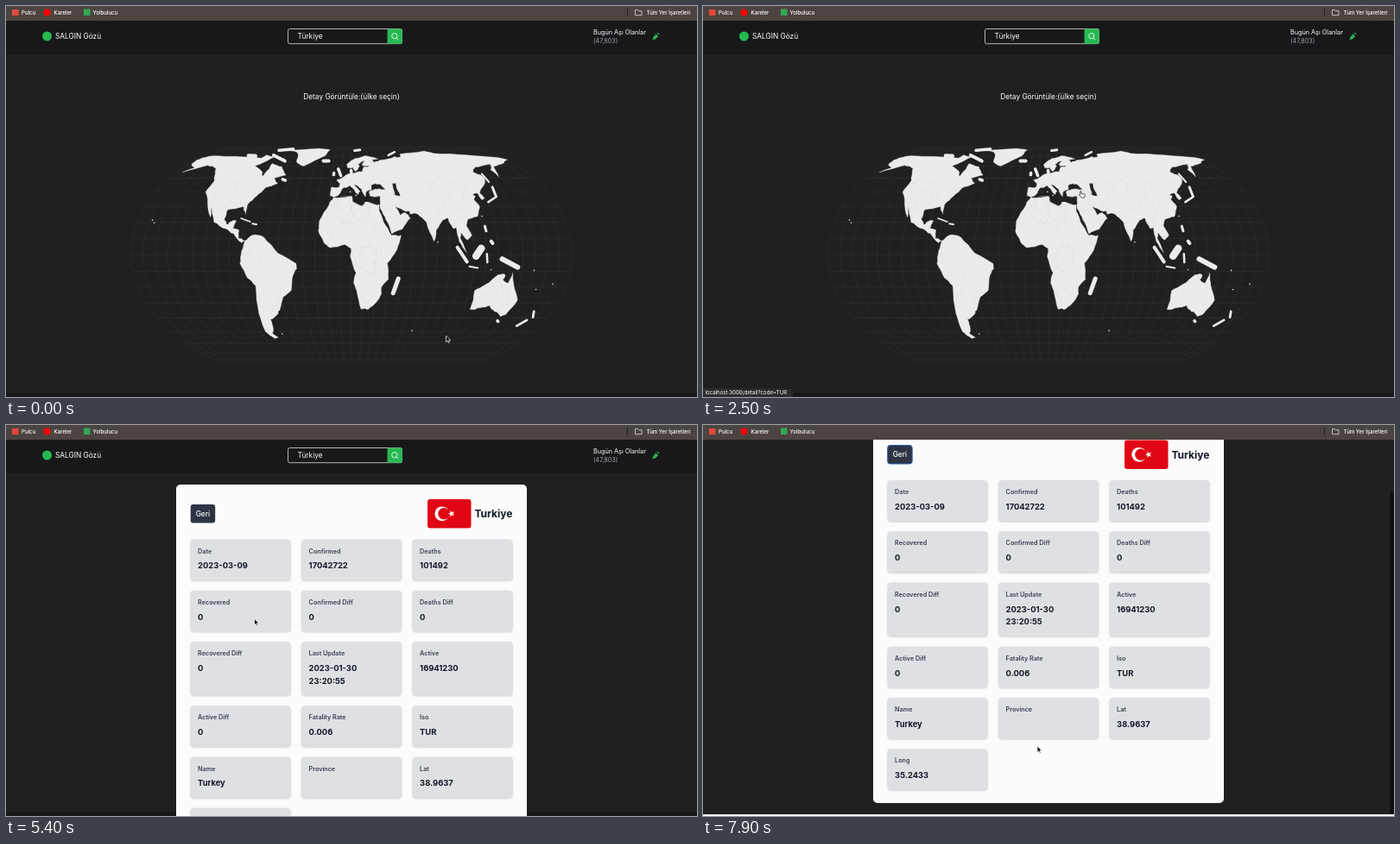
Recreate the animation shown at these times as an HTML page. Size 800 by 453 pixels, loop 8000 ms.

```html
<!DOCTYPE html>
<html lang="tr">
<head>
<meta charset="utf-8">
<title>Salgın haritası</title>
<style>
  html, body { margin: 0; height: 100%; overflow: hidden; background: #202022; }
  svg { display: block; width: 100vw; height: 100vh; }
  text { font-family: Inter, "Open Sans", sans-serif; font-size: 8.3px; fill: #fff; }
  .bar text { font-size: 6.1px; font-weight: 500; }
  .card { fill: #dfe0e4; filter: drop-shadow(0 1px 1px #0003); }
  .label { font-size: 7.2px; font-weight: 600; fill: #374151; }
  .value { font-size: 9.4px; font-weight: 700; fill: #111827; }
  .grid { fill: none; stroke: #303033; stroke-width: .6; }
  .land { fill: #ebebec; stroke: #ebebec; stroke-width: .3; }
  .island { stroke: #ebebec; stroke-linecap: round; }
  .border { fill: none; stroke: #dcdce0; stroke-width: .4; }
  .country { fill: none; stroke: #d6d6da; stroke-width: .4; }
  .country.on { fill: #27b951; stroke: #27b951; }
</style>
</head>
<body>
<svg id="stage" viewBox="0 0 800 453"></svg>
<script>
const LOOP = 8000, SCROLL = 68.5;

// Equal Earth projection, centred on 10 degrees east
function project([lon, lat]) {
  const theta = Math.asin(Math.sqrt(3) / 2 * Math.sin(lat * Math.PI / 180));
  const a = theta * theta, b = a * a * a, scale = 94.4;
  const slope = 1.340264 - .243318 * a + b * (.006251 + .034164 * a);
  const x = (lon - 10) * Math.PI / 180 * Math.cos(theta) / (Math.sqrt(3) / 2 * slope);
  const y = theta * (1.340264 - .081106 * a + b * (.000893 + .003796 * a));
  return [(400 + scale * x).toFixed(1), (288.3 - scale * y).toFixed(1)];
}

const trace = points => 'M' + points.map(p => project(p).join(' ')).join('L');
const pairs = list => Array.from({ length: list.length / 2 }, (_, i) => list.slice(2 * i, 2 * i + 2));

let seed = 7;
const random = () => (seed = seed * 16807 % 2147483647) / 2147483647 - .5;

// Splits every edge at a displaced midpoint to give a natural coastline
function roughen(points, limit) {
  return points.flatMap((p, i) => {
    const q = points[(i + 1) % points.length], dx = q[0] - p[0], dy = q[1] - p[1];
    const shift = random() * Math.min(.3, limit / Math.hypot(dx, dy));
    return [p, [(p[0] + q[0]) / 2 - dy * shift, (p[1] + q[1]) / 2 + dx * shift]];
  });
}
const coast = list => trace(roughen(roughen(pairs(list), 1.2), .8)) + 'Z';

const africa = [-6,36,10,37,11,33.5,19,30.3,22,33,32,31,34.5,31,34,27,37,20,43,11.8,51,11.8,47,3,39.3,-5,40.6,-15,
  35,-20,35.5,-24,32,-29,25,-34,18.5,-34,14.4,-22,11.8,-17,13.8,-11,9,-1,9.5,4,4.4,6.3,-7.6,4.4,-13,8,-17.4,14.8,-17,21,-9.7,31];
const europe = [-9,37,-9,43.2,-1.5,43.4,-1.2,46,-4.7,48.4,2.5,51.1,8.5,53.8,8.2,57,10.5,57.5,11,54,21,55,23.5,59.2,
  30,60,36,64,44,66,62,69.5,62,46,49,46,49.5,38.3,41.5,41.5,37,45.3,33,46,28.5,44.5,28,41.2,23.8,40.2,22.6,36.6,
  19.3,41.9,12.5,45.3,18,40.2,16,38,12.2,41.8,8.8,44.4,3.1,43,-.3,39,-5.6,36.1];
const scandinavia = [30,60,22.8,60,21.4,62,25,65.5,17.3,61.8,18.8,60,14.2,55.4,11.2,59,6,58.5,5,61.8,14.5,67.8,26,71,41,67,33.5,66.7,36,62];
const asia = [60,69.5,68,69,70,73,104,77.6,113,74,140,72.6,180,69,190,66.2,178,62.4,163.5,59.8,156.8,51,156,57,163,61.8,
  142,59,135.3,54.7,141,52,140.5,48.5,127.5,39.5,129.2,35.3,126.4,34.5,125,39,118,39,122,37,119.3,35,121.8,30,117,23.5,
  108,21.6,105.8,18,109.2,12,105,9,100.7,13.5,99.4,10,104,1.4,98.3,8,97.3,16.8,94.4,16.2,91.8,22.5,87,21.4,80.2,15,
  77.5,8.1,73,20,66.6,25.2,60,25.3];
const middleEast = [26.2,40,29,41.1,35,42,41.5,41.5,49,38,54,37,52.7,41,53,47,66,46,66,25.3,57,26.8,48,30,51.5,24.5,
  56.3,26,59.8,22.5,52,15.5,43.3,12.8,39,21.5,34.9,28.5,36,36.5,30.5,36.5,27,37];
const northAmerica = [-168,65.7,-166,68.3,-156,71,-128,70,-96,68,-94,72,-82,69.6,-87,64.5,-94.5,60,-82.4,55.2,-79,51.3,
  -77,57.5,-78,62.4,-65,59.5,-56,52.3,-66.5,50,-61,46,-70.5,43,-75.7,37,-81.2,31.5,-80.5,25.2,-84,30,-97,28,-97.5,22,
  -94,18.3,-90,21,-87,21,-88.5,16,-83.3,15,-83,10,-77.4,8.5,-80,7.4,-87.5,13,-94.5,16,-105.5,20,-113,31,-109.6,23.1,
  -117.3,33,-124.2,40,-123.5,48,-134,58,-147,60.8,-164,54.6,-157.5,58.6,-165.8,61.5];
const southAmerica = [-77.4,8.5,-71.7,12,-62,10.7,-50,1,-35.2,-5.3,-35,-8.5,-39,-14,-41,-22,-48.5,-26,-53.5,-34,
  -57,-37.5,-65,-41,-65.8,-47.6,-69,-51,-65.2,-54.8,-70,-55.2,-75,-50,-73.6,-37,-70.2,-19,-76.2,-14,-81.2,-5,-80,0];
const australia = [114,-22,115.5,-34.2,124,-33,131.5,-31.5,138,-35.5,146,-39,150,-37.3,153.5,-28,146,-19,142.5,-10.8,
  140.5,-17.4,135.5,-15,136.8,-12.2,131,-12,122,-18];
const greenland = [-73,78.3,-33,83.6,-18,80,-22,71,-42,60,-52,64,-55,71.5,-60,76];

// Islands are thick strokes: both ends and a width
const islands = [
  [-85,71.5,-66,65,4], [-115,71,-106,70.5,4.5], [-85,79,-68,82,3.5], [-57.5,49,-54.5,48.3,3.5],
  [-83.5,22.5,-75,20.3,1.6], [-73,19,-69.5,18.7,2], [-22,65,-16,65,4], [-4,57.5,-.8,52,3.5], [-8,54,-8,52.6,3.5],
  [48.8,-14.5,45.4,-23.5,5], [96.5,4.5,104.3,-4.2,4], [106.5,-7,113.5,-7.9,2], [111.5,-.8,116,4,8.5],
  [120.5,.5,121,-4.5,2.5], [133,-2.5,146,-7.5,6], [121.2,17.5,121.5,14.5,3], [124.5,8.2,125.5,7,4],
  [131,33,140.5,36.5,2.6], [140.5,37,142.5,43.3,3], [142.7,53.5,142.8,47,2], [55,71.5,65,76,2.5],
  [14,78.5,21,79.8,3], [146,-42,147,-42.5,3.5], [173.5,-35.5,176.5,-39.5,2.8], [173,-41.5,168,-45.7,2.8]
];
const islets = [-155.5,19.6,-157.8,21.3,69.5,-49.3,-59.5,-51.8,165.5,-21.3,178,-17.8,160,-9.5,124.5,-9,121,23.8,80.7,7.7,9,40,14,37.5];

const countries = {
  DZA: ['Algeria', [-8.6,27.4,-8.6,28.7,-1.2,32.3,-2.2,35.1,3,36.9,8.6,36.9,7.5,33.8,9.5,30.2,9.9,26.5,12,23.5,5.8,19.5,3.2,19.1,1.2,21.1]],
  TUR: ['Turkey', [26.2,40,29,41.1,35,42,41.5,41.5,44.5,38,36.5,36.6,30.5,36.5,27,37]],
  LBY: ['Libya', [9.9,26.5,9.5,30.2,11.5,33,19,30.3,25,31.6,24,19.5,14.2,22.6,12,23.5]],
  COD: ['Dem. Rep. Congo', [12.5,-5.8,18.5,4.5,27.4,5,31,2,29.3,-6,29.6,-13.3,19,-8]]
};

const rect = (x, y, w, h, fill, more = '') => `<rect x="${x}" y="${y}" width="${w}" height="${h}" fill="${fill}" ${more}/>`;
const text = (x, y, content, more = '') => `<text x="${x}" y="${y}" ${more}>${content}</text>`;
const path = (d, more) => `<path d="${d}" ${more}/>`;
const polyline = (steps, point) => trace(Array.from({ length: steps + 1 }, (_, i) => point(i)));

function graticule() {
  let d = '';
  for (let lon = -170; lon <= 190; lon += 10) {
    const limit = (lon - 10) % 180 ? 80 : 90;
    d += polyline(36, i => [lon, -limit + i * limit / 18]);
  }
  for (let lat = -90; lat <= 90; lat += 10) d += polyline(1, i => [-170 + 360 * i, lat]);
  return d;
}

// A wavy net, clipped to the land, suggests country borders
function borderNet() {
  let d = '';
  for (let lon = -125; lon < 150; lon += 9) d += polyline(40, i => [lon + 3 * Math.sin(i * .7 + lon), -35 + i * 2.1]);
  for (let lat = -33; lat < 55; lat += 9) d += polyline(130, i => [-125 + i * 2, lat + 2.5 * Math.sin(i * .6 + lat)]);
  return d;
}

function mapPage() {
  const land = [africa, europe, scandinavia, asia, middleEast, northAmerica, southAmerica, australia, greenland].map(coast).join('');
  return text(400, 108, '', 'id="title" text-anchor="middle"')
    + path(graticule(), 'class="grid"') + path(land, 'class="land"')
    + `<clipPath id="shore">${path(land, '')}</clipPath>` + path(borderNet(), 'class="border" clip-path="url(#shore)"')
    + islands.map(([a, b, c, d, width]) => path(trace([[a, b], [c, d]]), `class="island" stroke-width="${width}"`)).join('')
    + pairs(islets).map(p => path(trace([p, p]), 'class="island" stroke-width="1.6"')).join('')
    + Object.entries(countries).map(([code, [, shape]]) => path(trace(pairs(shape)) + 'Z', `class="country" id="${code}"`)).join('');
}

const backButton = x => rect(x, 92, 28.5, 21.5, '#2d3443', 'rx="3" class="back"') + text(x + 14.2, 105.8, 'Geri', 'text-anchor="middle" font-weight="500"');

function skeletonPage() {
  let out = rect(207, 69, 386, 460, '#fcfcfc', 'rx="5"') + backButton(224)
    + rect(426, 86, 50.7, 33.5, '#8e96a0', 'rx="3"') + rect(481, 93.3, 95, 18.7, '#8e96a0', 'rx="3"');
  for (let i = 0; i < 16; i++) {
    const x = 224 + i % 3 * 121.7, y = 132.5 + Math.floor(i / 3) * 59.3;
    out += rect(x, y, 109, 47.3, '', 'rx="4" class="card"')
      + rect(x + 8.3, y + 8.2, 37, 10.4, '#c8cbd0', 'rx="3"') + rect(x + 8.3, y + 23, 69, 14.8, '#8e96a0', 'rx="3"');
  }
  return out;
}

function flag() {
  const star = Array.from({ length: 10 }, (_, i) => {
    const r = i % 2 ? 1.6 : 4.2, a = Math.PI * (1 + i / 5);
    return [515.8 + r * Math.cos(a), 102.8 + r * Math.sin(a)];
  });
  return rect(488, 86, 50.5, 33.6, '#e00613', 'rx="3"') + '<circle cx="504.7" cy="102.8" r="8.4" fill="#fff"/>'
    + '<circle cx="506.9" cy="102.8" r="6.7" fill="#e00613"/>' + `<polygon points="${star}" fill="#fff"/>`;
}

function detailPage() {
  const fields = [['Date', '2023-03-09'], ['Confirmed', '17042722'], ['Deaths', '101492'],
    ['Recovered', '0'], ['Confirmed Diff', '0'], ['Deaths Diff', '0'],
    ['Recovered Diff', '0'], ['Last Update', '2023-01-30', '23:20:55'], ['Active', '16941230'],
    ['Active Diff', '0'], ['Fatality Rate', '0.006'], ['Iso', 'TUR'],
    ['Name', 'Turkey'], ['Province', ''], ['Lat', '38.9637'], ['Long', '35.2433']];
  const cards = fields.map(([label, value, second = ''], i) => {
    const row = Math.floor(i / 3), x = 213.7 + i % 3 * 128.5, y = 132.5 + row * 59.3 + (row > 2 ? 14.8 : 0);
    return rect(x, y, 115.7, row === 2 ? 62 : 47.3, '', 'rx="4" class="card"')
      + text(x + 8.4, y + 16.1, label, 'class="label"') + text(x + 8.4, y + 33.9, value, 'class="value"')
      + text(x + 8.4, y + 48.8, second, 'class="value"');
  });
  return rect(197, 69, 406, 437.5, '#fcfcfc', 'rx="5"') + backButton(213.7) + flag()
    + text(586.5, 107.2, 'Turkiye', 'text-anchor="end" style="font-size:12px;font-weight:700;fill:#111827"') + cards.join('');
}

const header = rect(0, 17, 800, 39, '#18181a') + '<circle cx="47.5" cy="35" r="5.5" fill="#27b951"/>'
  + text(57, 38, 'SALGIN Gözü') + rect(326.5, 26.5, 132, 17.2, '#18181a', 'rx="2" stroke="#ddd" stroke-width=".8"')
  + text(337.5, 38, 'Türkiye') + rect(441.5, 26.5, 17.2, 17.2, '#27b951', 'rx="1.5"')
  + path('M452 37L454 39.2M452.9 34.7a3.1 3.1 0 1 1-6.2 0a3.1 3.1 0 1 1 6.2 0', 'fill="none" stroke="#fff" stroke-width=".8"')
  + text(680, 32.5, 'Bugün Aşı Olanlar', 'style="font-size:7.25px"') + text(680, 43, '(47,803)', 'style="font-size:7.2px;fill:#9ca3af"')
  + path('M748 39.5l2-2M754 30.5l2.5 2.5M755.2 31.8l-1.8 1.8M751.5 32.2l3.6 3.6', 'stroke="#27b951"')
  + path('M752.2 33l2.4 2.4l-3 3l-2.3.3l-.2-2.4Z', 'fill="#27b951"');

const bookmarks = rect(0, 0, 800, 17, '#4c4440') + rect(7, 4, 7.5, 7, '#e5483c') + '<circle cx="47.5" cy="7.5" r="4" fill="#f00"/>'
  + rect(90, 3.5, 7.5, 7.5, '#34a853') + text(18, 9.6, 'Pulcu') + text(55.5, 9.6, 'Kareler') + text(100.5, 9.6, 'Yolbulucu')
  + rect(719, 3, .8, 8.5, '#1c1816') + path('M728.5 4.5h2.8l1 1.2h3.7v5h-7.5Z', 'fill="none" stroke="#ddd" stroke-width=".8"')
  + text(792.5, 9.6, 'Tüm Yer İşaretleri', 'text-anchor="end"');

const stage = document.getElementById('stage');
stage.innerHTML = rect(0, 0, 800, 453, '#202022') + rect(0, 448, 800, 5, '#18181a', 'id="floor"')
  + `<g id="page">${header}<g id="map">${mapPage()}</g><g id="skeleton">${skeletonPage()}</g><g id="detail">${detailPage()}</g></g>`
  + `<g id="scrolled">${rect(795.5, 0, 4, 375, '#0c0c0d', 'rx="2" id="thumb"')}${rect(0, 451, 800, 2, '#f4f4f4', 'id="edge"')}</g>`
  + `<g class="bar">${bookmarks}</g>`
  + `<g class="bar" id="status">${rect(-3, 443, 107, 13, '#2b2b2d', 'rx="2"')}${text(2.5, 450, '', 'id="link" style="font-weight:400"')}</g>`
  + `<g id="cursor">${path('M0 0V7.3L1.7 5.7L2.9 8.3L4.1 7.8L2.9 5.3H5.2Z', 'id="arrow" fill="#000" stroke="#fff" stroke-width=".7"')}`
  + path('M1.2.8Q2 0 2.6.9V3.2L6 3.9Q7 4.2 6.8 5.4L6 8H2.8L.2 5.2Q0 4.2 1.2 4.6Z', 'id="hand" fill="#fff" stroke="#111" stroke-width=".7"') + '</g>';

const el = Object.fromEntries([...stage.querySelectorAll('[id]')].map(node => [node.id, node]));
const show = (node, visible) => node.setAttribute('display', visible ? 'inline' : 'none');
const move = (node, x, y) => node.setAttribute('transform', `translate(${x} ${y})`);
const smooth = p => p * p * (3 - 2 * p);

const cursorStops = [[0, 509.5, 382], [200, 507, 380], [400, 507, 380], [1500, 391, 245], [2000, 391, 245], [2400, 435.5, 214],
  [3700, 435.5, 215], [5000, 287.5, 224.5], [6400, 287.5, 224.5], [7400, 387, 372], [LOOP, 387, 372]];
const hovers = [[0, ''], [1100, 'COD'], [1300, ''], [1400, 'DZA'], [2100, 'LBY'], [2200, ''], [2400, 'TUR'], [3900, '']];

function cursorAt(t) {
  const i = cursorStops.findIndex(stop => stop[0] > t);
  const [t0, x0, y0] = cursorStops[i - 1], [t1, x1, y1] = cursorStops[i];
  const p = smooth((t - t0) / (t1 - t0));
  return [x0 + (x1 - x0) * p, y0 + (y1 - y0) * p];
}

function draw(now) {
  const t = Math.floor(now % LOOP / 100) * 100;
  const onMap = t < 3200, loading = !onMap && t < 3600;
  const code = hovers.findLast(([start]) => start <= t)[1];
  const lit = onMap && (code !== 'TUR' || t >= 2600) ? code : '';

  show(el.map, onMap);
  show(el.skeleton, loading);
  show(el.detail, !onMap && !loading);
  for (const key in countries) el[key].classList.toggle('on', key === lit);
  el.title.textContent = 'Detay Görüntüle:' + (lit ? countries[lit][0] : '(ülke seçin)');

  show(el.status, code);
  el.link.textContent = 'localhost:3000/detail?code=' + code;

  const scroll = SCROLL * smooth(Math.min(1, Math.max(0, (t - 7400) / 400)));
  move(el.page, 0, -scroll);
  show(el.scrolled, scroll > 0);
  show(el.edge, scroll === SCROLL);
  show(el.floor, scroll === 0);
  move(el.thumb, 0, 17 + scroll * .89);
  el.detail.querySelector('.back').setAttribute('stroke', scroll > 0 ? '#2f5fb3' : 'none');

  const overLink = onMap && code;
  show(el.hand, overLink);
  show(el.arrow, !overLink);
  move(el.cursor, ...cursorAt(t));
  requestAnimationFrame(() => draw(performance.now() - begin));
}

const begin = performance.now();
draw(0);
</script>
</body>
</html>
```
